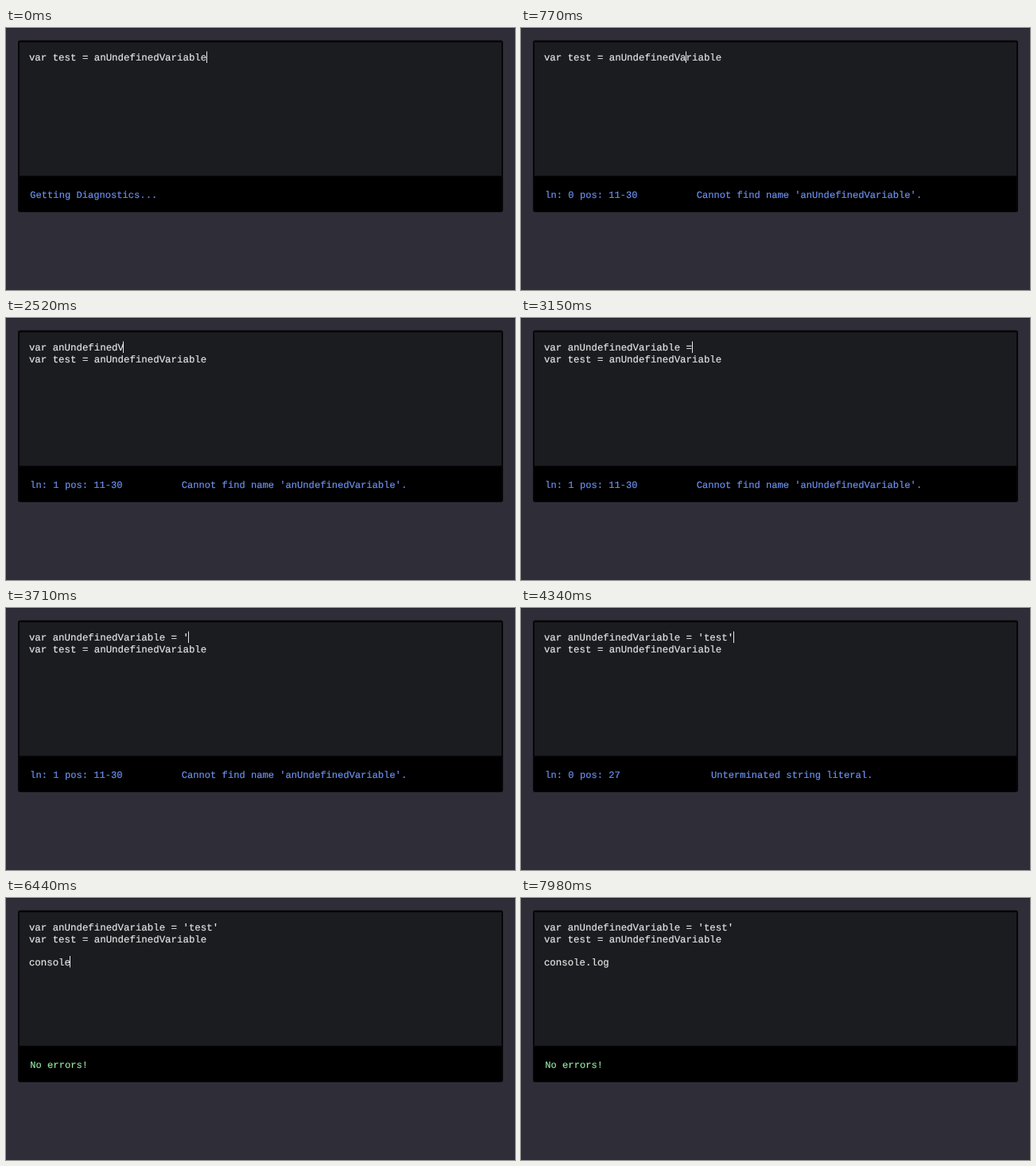
These frames come from a looping animation (640x330 px, 8 s). An HTML page:

```html
<!DOCTYPE html>
<html lang="en">
<head>
<meta charset="utf-8">
<title>Live diagnostics</title>
<style>
  html, body { margin: 0; width: 100%; height: 100%; overflow: hidden; background: #2e2d38; }
  svg { display: block; width: 640px; height: 330px; }
  text {
    font-family: "Liberation Mono", "Courier New", monospace;
    white-space: pre;
    text-rendering: geometricPrecision;
    stroke-width: .2px;
  }
  .code text { font-size: 12.42px; fill: #e4e4e4; stroke: #e4e4e4; }
  .status text { font-size: 12.12px; fill: #6b90ee; stroke: #6b90ee; }
  .status.ok text { fill: #92e3a0; stroke: #92e3a0; }
</style>
</head>
<body>
<svg viewBox="0 0 640 330">
  <rect width="640" height="330" fill="#2e2d38"/>
  <rect width="640" height="1" fill="#25242e"/>
  <rect x="15" y="15.5" width="610" height="216.5" rx="3" fill="#060608"/>
  <rect x="17" y="18" width="606" height="168" fill="#1b1c20"/>
  <rect x="17" y="187.5" width="606" height="43" fill="#000"/>
  <g class="code">
    <text x="28.9" y="41"/>
    <text x="28.9" y="55.5"/>
    <text x="28.9" y="70"/>
    <text x="28.9" y="84.5"/>
  </g>
  <rect id="caret" width="1" height="14.5" fill="#e8e8e8"/>
  <g class="status">
    <text id="place" x="30.3" y="214"/>
    <text id="message" y="214" text-anchor="middle"/>
  </g>
</svg>
<script>
  const LOOP = 8000, LEAD = 10;
  const CODE_CHAR = 7.453, STATUS_CHAR = 7.273, ROW = 14.5;
  const DECLARE = "var anUndefinedVariable = 'test'";
  const USE = "var test = anUndefinedVariable";
  const LOG = "console.log";

  // n key presses spread evenly from a to b
  const run = (a, b, n) => Array.from({ length: n }, (_, i) => a + (b - a) * i / (n - 1));
  const declareKeys = [...run(1820, 2030, 4), ...run(2100, 2800, 19),
    2940, 3150, 3290, 3710, 3850, 3920, 4060, 4200, 4340];
  const logKeys = [5810, 5950, 6020, 6160, 6230, 6370, 6440, 6580, 6720, 6860, 7000];

  const ENTER = 1610;
  const leftHold = { from: 630, to: 1400 };
  const blinks = [[70, 490], [4830, 5250], [7490, LOOP + LEAD]];
  const missing = "Cannot find name 'anUndefinedVariable'.";
  const statuses = [
    [0, "Getting Diagnostics...", ""],
    [490, "ln: 0 pos: 11-30", missing],
    [2030, "ln: 1 pos: 11-30", missing],
    [4060, "ln: 0 pos: 27", "Unterminated string literal."],
    [4620, "No errors!", ""]
  ];

  const rows = document.querySelectorAll(".code text");
  const caret = document.getElementById("caret");
  const status = document.querySelector(".status");
  const place = document.getElementById("place");
  const message = document.getElementById("message");

  const typed = (keys, t) => keys.filter(k => k <= t).length;
  const put = (el, s) => { if (el.textContent !== s) el.textContent = s; };

  function caretAt(t) {
    if (t < ENTER) {
      const p = (t - leftHold.from) / (leftHold.to - leftHold.from);
      return [0, Math.round(USE.length * (1 - Math.min(1, Math.max(0, p))))];
    }
    if (t < 1750) return [1, 0];
    if (t < 4410) return [0, typed(declareKeys, t)];
    if (t < 5320) return [1, USE.length];
    if (t < 5460) return [2, 0];
    return [3, typed(logKeys, t)];
  }

  function draw(t) {
    const split = t >= ENTER;
    put(rows[0], split ? DECLARE.slice(0, typed(declareKeys, t)) : USE);
    put(rows[1], split ? USE : "");
    put(rows[3], LOG.slice(0, typed(logKeys, t)));

    const [row, col] = caretAt(t);
    caret.setAttribute("x", Math.round(28.6 + col * CODE_CHAR - .4));
    caret.setAttribute("y", 29.5 + row * ROW);
    caret.style.opacity = blinks.some(([a, b]) => t >= a && t < b) ? 0 : 1;

    const [, where, what] = statuses.filter(s => s[0] <= t).pop();
    put(place, where);
    put(message, what);
    message.setAttribute("x", 246.1 + where.length * STATUS_CHAR);
    status.classList.toggle("ok", where === "No errors!");
  }

  function frame() {
    draw(performance.now() % LOOP + LEAD);
    requestAnimationFrame(frame);
  }
  frame();
</script>
</body>
</html>
```
